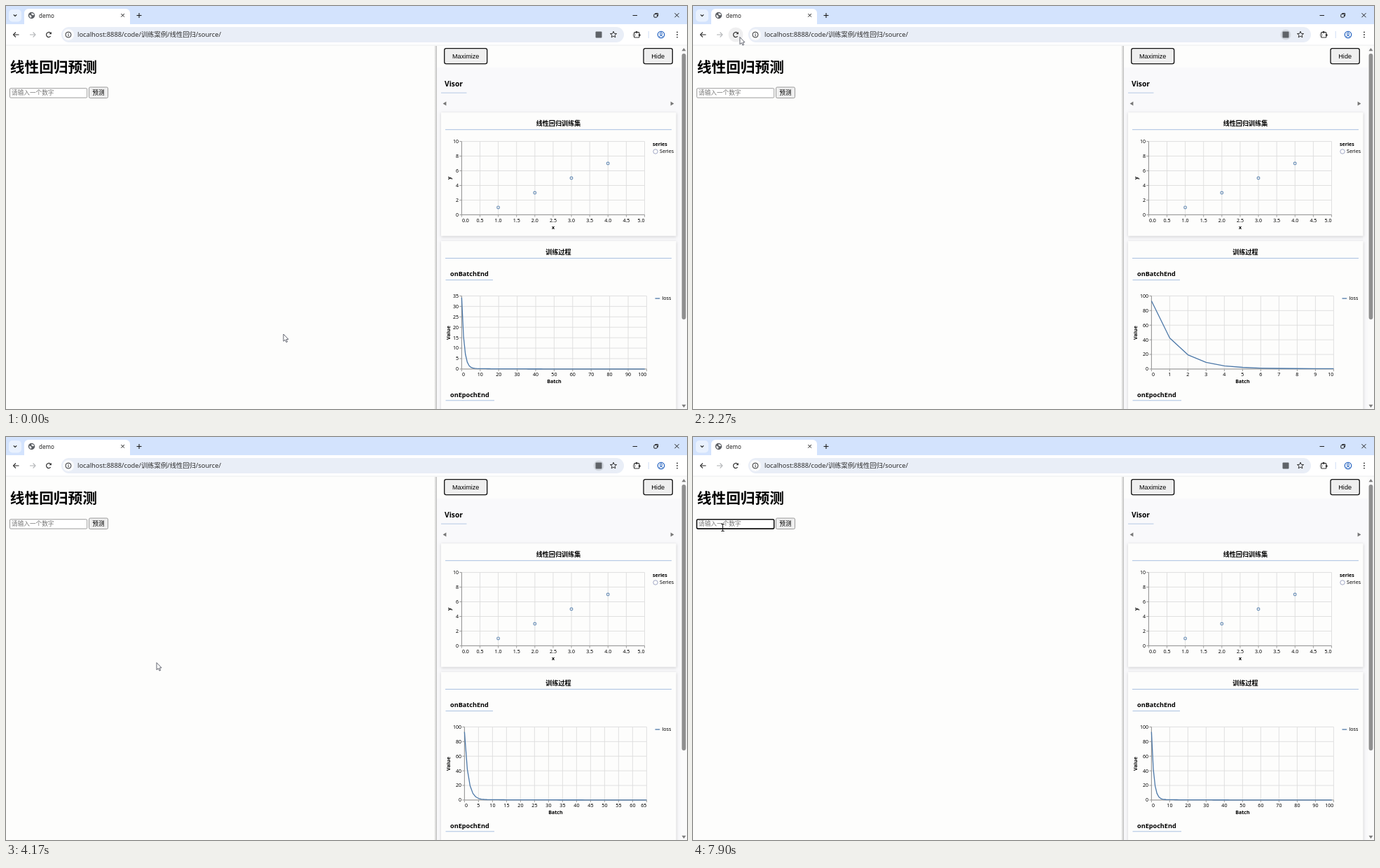
Write an HTML page with a canvas that moves like this. It is 972 px wide and 576 px high and loops after 8000 ms.

```html
<!DOCTYPE html>
<html lang="zh">
<head>
<meta charset="utf-8">
<title>demo</title>
<style>
html, body { margin: 0; width: 100%; height: 100%; overflow: hidden; background: #fdfdfc; }
canvas { display: block; width: 972px; height: 576px; }
</style>
</head>
<body>
<canvas id="stage" width="972" height="576"></canvas>
<script>
const ctx = document.getElementById('stage').getContext('2d');
const LOOP = 8000;
const SANS = '"Noto Sans", "Noto Sans CJK SC", "Noto Sans CJK", sans-serif';
const CJK = '"Noto Sans CJK SC", "Noto Sans CJK", sans-serif';
const ARIAL = '"Liberation Sans", sans-serif';
const PAGE = '#fdfdfc', BLUE = '#4c78a8', INK = '#1f1f1f';

const RELOAD = { press: 1740, clear: 1890, visor: 1930, translate: 2100 };
const BATCH_START = 1926, BATCH_MS = 34.3, LAST_BATCH = 99;

// time, x, y of the pointer tip
const POINTER = [
  [0, 396, 469], [1200, 396, 469], [1680, 63, 41], [1900, 63, 41],
  [2150, 66.5, 44.5], [2300, 67, 44.5], [2670, 151, 130], [3400, 223, 320],
  [3900, 223, 320], [4700, 193, 329.5], [7270, 193, 329.5], [7720, 42, 129]
];

function rect(x, y, w, h, fill) {
  ctx.fillStyle = fill;
  ctx.fillRect(x, y, w, h);
}

function box(x, y, w, h, r, fill, stroke, width = 1) {
  ctx.beginPath();
  ctx.roundRect(x, y, w, h, r);
  if (fill) { ctx.fillStyle = fill; ctx.fill(); }
  if (stroke) { ctx.strokeStyle = stroke; ctx.lineWidth = width; ctx.stroke(); }
}

function disc(x, y, r, fill, stroke, width = 1) {
  ctx.beginPath();
  ctx.arc(x, y, r, 0, Math.PI * 2);
  if (fill) { ctx.fillStyle = fill; ctx.fill(); }
  if (stroke) { ctx.strokeStyle = stroke; ctx.lineWidth = width; ctx.stroke(); }
}

function trace(points, close) {
  ctx.beginPath();
  points.forEach(([x, y], i) => i ? ctx.lineTo(x, y) : ctx.moveTo(x, y));
  if (close) ctx.closePath();
}

function line(points, stroke, width = 1) {
  trace(points);
  ctx.strokeStyle = stroke;
  ctx.lineWidth = width;
  ctx.stroke();
}

function poly(points, fill) {
  trace(points, true);
  ctx.fillStyle = fill;
  ctx.fill();
}

function text(str, x, y, size, { bold = false, align = 'left', color = '#000', font = SANS } = {}) {
  ctx.font = `${bold ? 'bold ' : ''}${size}px ${font}`;
  ctx.textAlign = align;
  ctx.fillStyle = color;
  ctx.fillText(str, x, y);
}

function sideText(str, x, y) {
  ctx.save();
  ctx.translate(x, y);
  ctx.rotate(-Math.PI / 2);
  text(str, 0, 0, 7.1, { bold: true, align: 'center' });
  ctx.restore();
}

function pointerAt(t) {
  let i = POINTER.length - 1;
  while (POINTER[i][0] > t) i--;
  const a = POINTER[i], b = POINTER[i + 1];
  if (!b) return [a[1], a[2]];
  const p = (t - a[0]) / (b[0] - a[0]), e = p * p * (3 - 2 * p);
  return [a[1] + (b[1] - a[1]) * e, a[2] + (b[2] - a[2]) * e];
}

function favicon(loading, t) {
  if (loading) {
    disc(36.5, 13.5, 3, null, '#aab0b8', 1);
    const a = t / 90;
    ctx.beginPath();
    ctx.arc(36.5, 13.5, 3, a, a + 2.2);
    ctx.strokeStyle = '#1a56b0';
    ctx.lineWidth = 1.4;
    ctx.stroke();
    return;
  }
  disc(36.5, 13.5, 4.7, '#5a5e63');
  poly([[33.2, 12.5], [35.5, 13.4], [36.6, 15], [35.6, 17], [33.6, 15.6]], '#fff');
  poly([[36.6, 10], [39.3, 11], [40, 13], [38.2, 13.2], [36.2, 12]], '#fff');
}

function tabStrip(loading, t) {
  rect(0, 0, 972, 27, '#d3e3fd');
  box(4, 5, 18, 17.5, 5, '#e9f1fe');
  line([[10.8, 12.3], [13, 14.5], [15.2, 12.3]], INK, 1.2);
  box(26, 4, 151, 30, 6, '#fff');
  favicon(loading, t);
  text('demo', 47, 16.6, 8, { color: INK });
  line([[164.3, 11], [168.9, 15.6]], INK);
  line([[168.9, 11], [164.3, 15.6]], INK);
  line([[186.5, 13.5], [193.5, 13.5]], INK, 1.1);
  line([[190, 10], [190, 17]], INK, 1.1);
  line([[894.5, 13.5], [901, 13.5]], INK);
  box(924.8, 11.6, 4.6, 4.6, 1, null, INK);
  line([[926.5, 10.5], [930.6, 10.5], [930.6, 14.6]], INK);
  line([[954.5, 10.2], [960.5, 16.2]], INK);
  line([[960.5, 10.2], [954.5, 16.2]], INK);
}

function arrow(x, dir, color) {
  line([[x - 4 * dir, 41], [x + 4 * dir, 41]], color, 1.1);
  line([[x + 0.6 * dir, 37.5], [x + 4 * dir, 41], [x + 0.6 * dir, 44.5]], color, 1.1);
}

function star(x, y) {
  const pts = [];
  for (let i = 0; i < 10; i++) {
    const a = -Math.PI / 2 + i * Math.PI / 5, r = i % 2 ? 2.1 : 4.8;
    pts.push([x + r * Math.cos(a), y + r * Math.sin(a)]);
  }
  trace(pts, true);
  ctx.strokeStyle = '#333';
  ctx.lineWidth = 1;
  ctx.stroke();
}

function toolbar(t, hover) {
  rect(0, 26, 972, 30, '#fff');
  rect(0, 55.5, 972, 1, '#eceef0');
  arrow(14.5, -1, '#333');
  arrow(38, 1, '#b4b6b9');
  if (hover) disc(61, 41, 10.5, hover);
  ctx.beginPath();
  ctx.arc(61, 41, 3.4, -0.5, -5.6, true);
  ctx.strokeStyle = '#333';
  ctx.lineWidth = 1.2;
  ctx.stroke();
  poly([[64.9, 36.9], [64.9, 40.3], [61.5, 40.3]], '#333');

  box(79, 30, 803, 22, 11, '#e9eef7');
  disc(89, 41, 8, '#fbfcfe');
  disc(89, 41, 4, null, '#333');
  rect(88.5, 40.4, 1, 2.8, '#333');
  rect(88.5, 38.6, 1, 1, '#333');
  text('localhost:8888/code/训练案例/线性回归/source/', 102, 44.3, 9.3, { color: '#2a2a2a' });

  if (t < RELOAD.press || t >= RELOAD.translate) {
    if (t >= RELOAD.translate && t < 5700) disc(846, 41, 7.5, '#d3d8e0');
    box(841.5, 36.5, 9, 9, 1, '#5f6368');
  }
  star(867, 41);
  box(896.5, 37.6, 7.4, 7.4, 1, null, '#333', 1.1);
  disc(900, 37.2, 1.5, '#333');
  disc(904.2, 41.4, 1.5, '#333');
  disc(896.6, 41.4, 1.3, '#fff', '#333', 0.8);
  rect(916.7, 36, 1, 10, '#d0def6');
  disc(935, 41, 4.7, null, '#1f5fbf', 1.2);
  disc(935, 39.7, 1.6, null, '#1f5fbf');
  ctx.beginPath();
  ctx.arc(935, 45.6, 3.2, -2.6, -0.54);
  ctx.stroke();
  for (const y of [37.4, 41, 44.6]) disc(958, y, 0.95, '#333');
}

function form(focused) {
  text('线性回归预测', 5.8, 95.3, 20.7, { bold: true, font: CJK });
  if (focused) box(5.4, 117.7, 110.3, 13.4, 1.8, '#fff', '#101010', 1.6);
  else box(5.5, 117.7, 110.2, 13.4, 1.3, '#fff', '#858585', 0.8);
  text('请输入一个数字', 8, 127.4, 8.65, { color: '#757575', font: CJK });
  box(118.5, 116, 27, 15.5, 1.8, '#efefef', '#858585', 0.8);
  text('预测', 132, 127.3, 8.65, { align: 'center', font: CJK });
}

function button(label, x, w) {
  box(x, 60.7, w, 22, 2.6, '#efefef', '#111', 1.3);
  text(label, x + w / 2, 74.7, 9.1, { align: 'center', font: ARIAL });
}

function card(title, y, h) {
  ctx.save();
  ctx.shadowColor = 'rgba(0,0,0,.16)';
  ctx.shadowBlur = 4;
  ctx.shadowOffsetY = 1;
  rect(621, y, 335.5, h, PAGE);
  ctx.restore();
  text(title, 788.5, y + 19, 9.1, { bold: true, align: 'center', font: CJK });
  rect(627, y + 24, 323, 1, '#a9c0e0');
}

function heading(str, y, end) {
  text(str, 634, y, 9.15, { bold: true });
  rect(627.5, y + 4.7, end - 627.5, 1, '#a9c0e0');
}

// Axes with grid; a = { x0, x1, y0, y1, xMax, xStep, yMax, yStep, digits }
function axes(a) {
  const nx = Math.round(a.xMax / a.xStep), ny = Math.round(a.yMax / a.yStep);
  for (let i = 0; i <= nx; i++) {
    const x = a.x0 + (a.x1 - a.x0) * i / nx;
    line([[x, a.y0], [x, a.y1]], '#ddd', 0.9);
    line([[x, a.y1], [x, a.y1 + 3.2]], '#888', 0.8);
    const align = i === 0 ? 'left' : i === nx ? 'right' : 'center';
    text((i * a.xStep).toFixed(a.digits), x + (i ? 0 : 0.5), a.y1 + 10.5, 7.1, { align });
  }
  for (let i = 0; i <= ny; i++) {
    const y = a.y1 - (a.y1 - a.y0) * i / ny;
    line([[a.x0, y], [a.x1, y]], '#ddd', 0.9);
    line([[a.x0 - 3.2, y], [a.x0, y]], '#888', 0.8);
    text(String(i * a.yStep), a.x0 - 4.3, y + 2.4, 7.1, { align: 'right' });
  }
  line([[a.x0, a.y0], [a.x0, a.y1], [a.x1, a.y1]], '#888', 0.9);
}

function scatter() {
  axes({ x0: 650.4, x1: 911.5, y0: 193.6, y1: 298.4, xMax: 5, xStep: 0.5, yMax: 10, yStep: 2, digits: 1 });
  for (let x = 1; x <= 4; x++) {
    disc(650.4 + x * 52.2, 298.4 - (2 * x - 1) * 10.48, 1.9, null, '#6f93ba', 1.15);
  }
  text('x', 781, 318.6, 7.1, { bold: true, align: 'center' });
  sideText('y', 634.5, 246);
  text('series', 923, 199.6, 7.1, { bold: true });
  disc(927, 208, 3.2, null, '#a3a9c6', 1);
  text('Series', 933, 210.4, 7.1);
}

function niceStep(span) {
  const raw = span / 10, base = 10 ** Math.floor(Math.log10(raw) + 1e-9), e = raw / base;
  return base * (e >= Math.sqrt(50) ? 10 : e >= Math.sqrt(10) ? 5 : e >= Math.SQRT2 ? 2 : 1);
}

function lossChart(n, first, yMax, yStep, x0) {
  const span = Math.max(1, n), xStep = niceStep(span);
  const xMax = Math.ceil(span / xStep - 1e-6) * xStep;
  const x1 = 914.4, y0 = 414.4, y1 = 518.9;
  axes({ x0, x1, y0, y1, xMax, xStep, yMax, yStep, digits: xStep < 1 ? 1 : 0 });
  const pts = [];
  for (let k = 0; k <= n; k++) {
    const loss = first * 0.452 ** k + first * 0.007 * Math.exp(-k / 25);
    pts.push([x0 + (x1 - x0) * k / xMax, y1 - (y1 - y0) * loss / yMax]);
  }
  ctx.lineJoin = 'round';
  line(pts, BLUE, 1.3);
  ctx.lineJoin = 'miter';
  text('Batch', (x0 + x1) / 2, 539.4, 7.1, { bold: true, align: 'center' });
  sideText('Value', 633.8, 467);
  line([[926.5, 418], [933.2, 418]], BLUE, 1.3);
  text('loss', 936.5, 420.3, 7.1);
}

function scrollbar() {
  rect(963, 57, 9, 519, '#fbfbfb');
  poly([[964.5, 64.3], [970.5, 64.3], [967.5, 60]], '#7d7d7d');
  box(964.6, 68, 5.8, 380, 2.9, '#8f8f8f');
  poly([[964.5, 569.7], [970.5, 569.7], [967.5, 574]], '#7d7d7d');
}

function visor(t) {
  const shade = ctx.createLinearGradient(611, 0, 615, 0);
  shade.addColorStop(0, 'rgba(0,0,0,0)');
  shade.addColorStop(1, 'rgba(0,0,0,.25)');
  rect(611, 57, 4, 519, shade);
  rect(615, 57, 348, 519, PAGE);
  rect(615, 88, 348, 488, '#f9f9fb');
  button('Maximize', 625.7, 61);
  button('Hide', 910, 41.3);
  text('Visor', 626, 115.2, 10.3, { bold: true });
  rect(621, 123.6, 36.5, 1, '#b5c8e4');
  poly([[628.4, 136.6], [628.4, 142.6], [623.6, 139.6]], '#777');
  poly([[948.6, 136.6], [948.6, 142.6], [953.4, 139.6]], '#777');
  card('线性回归训练集', 152.2, 176.5);
  scatter();
  card('训练过程', 336, 260);
  heading('onBatchEnd', 386.4, 695);
  if (t < RELOAD.clear) lossChart(LAST_BATCH, 34, 35, 5, 650.4);
  else {
    const n = Math.floor((t - BATCH_START) / BATCH_MS);
    lossChart(Math.max(0, Math.min(LAST_BATCH, n)), 92.5, 100, 20, 654.4);
  }
  heading('onEpochEnd', 558.6, 697);
  scrollbar();
}

function pointer(x, y) {
  ctx.save();
  ctx.translate(x, y);
  if (x > 5 && x < 116 && y > 117 && y < 132) {
    line([[0.5, -4.5], [0.5, 5.5]], '#111', 1);
    line([[-1.8, -4.5], [2.8, -4.5]], '#111', 0.9);
    line([[-1.8, 5.5], [2.8, 5.5]], '#111', 0.9);
  } else {
    trace([[0, 0], [0, 10.2], [2.4, 8.1], [4, 11.6], [5.6, 10.9], [4.1, 7.5], [7, 7.3]], true);
    ctx.fillStyle = '#fff';
    ctx.fill();
    ctx.strokeStyle = '#3c3f4c';
    ctx.lineWidth = 0.8;
    ctx.stroke();
  }
  ctx.restore();
}

function draw(t) {
  const [px, py] = pointerAt(t);
  const loading = t >= RELOAD.press && t < RELOAD.visor;
  const over = Math.hypot(px - 61, py - 41) < 10.5;
  rect(0, 0, 972, 576, PAGE);
  tabStrip(loading, t);
  toolbar(t, over ? (t < 2000 ? '#dcdcde' : '#efeff0') : null);
  form(t >= 7800);
  if (t < RELOAD.clear || t >= RELOAD.visor) visor(t);
  pointer(px, py);
}

const start = performance.now();
function tick() {
  draw((performance.now() - start) % LOOP);
  requestAnimationFrame(tick);
}
tick();
</script>
</body>
</html>
```
